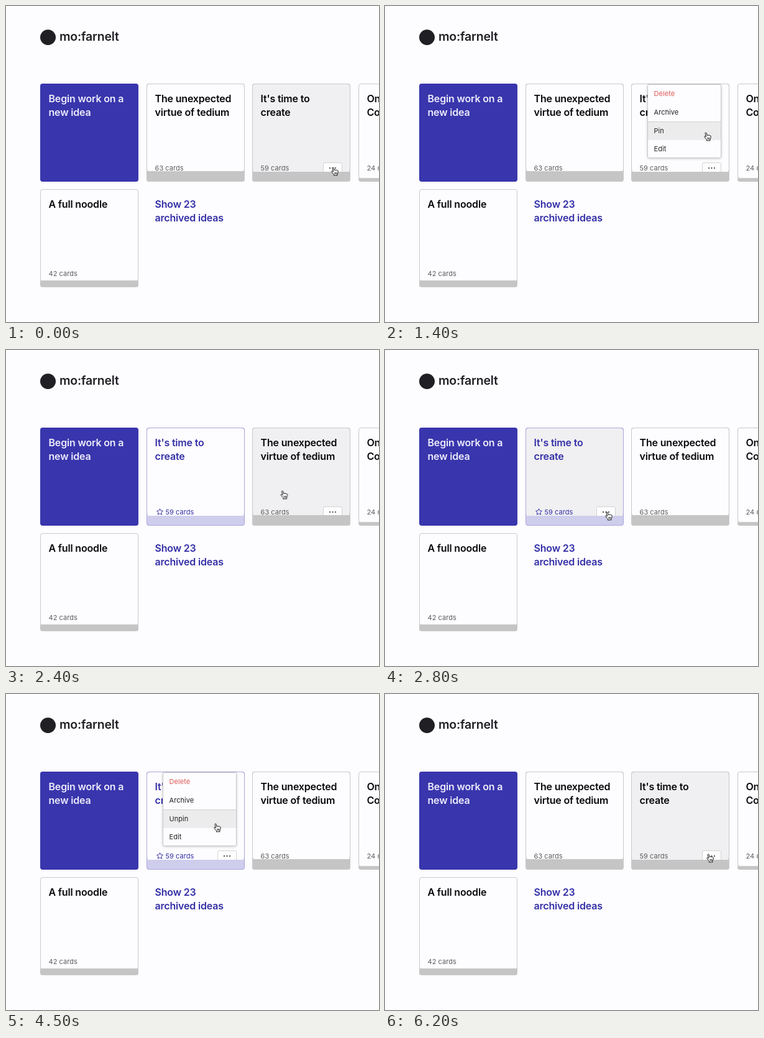
An HTML page for the animation above (6300 ms loop, 600 by 509 pixels).

```html
<!DOCTYPE html>
<html lang="en">
<head>
<meta charset="utf-8">
<title>Idea board</title>
<style>
html, body { margin: 0; width: 100%; height: 100%; overflow: hidden; background: #fdfcfe; }
body { position: relative; font: 11px/16px Inter, sans-serif; letter-spacing: .005em; color: #5c5c5f; }
div, svg, .brand { position: absolute; box-sizing: border-box; }

.mark { left: 55px; top: 37.5px; width: 25px; height: 25px; border-radius: 50%; background: #1f1f24; }
.brand { left: 86px; top: 36px; font: 600 19.5px/26px Inter, sans-serif; letter-spacing: -.011em; color: #1f1f24; }

.view { inset: 0; }
.card { left: var(--x); top: var(--y, 125px); width: 158px; height: 158px; border-radius: 4px; background: #c5c5c5; --line: #c9c9cb; }
.body { left: 0; top: 0; width: 158px; height: var(--h); overflow: hidden; border-radius: 4px; background: #fdfcfe; }
.edge { inset: 0; border: 1px solid var(--line); border-radius: 4px; }
.edge.low { bottom: auto; height: var(--h); border-color: var(--line) var(--line) transparent; }
.title { left: 13.5px; top: 13px; font: 600 16px/22px Inter, sans-serif; letter-spacing: -.011em; color: #08080a; white-space: nowrap; }
.count { left: 13.5px; top: 127.5px; white-space: nowrap; }
.new { background: #3936ad; }
.new .title { color: #edecfb; }
.pinned { background: #cfcdec; --line: #aaa8dc; }
.pinned .title, .pinned .count, .link .title { color: #332fa6; }
.pinned .count { left: 30.5px; }
.star { left: 16px; top: 130px; fill: none; stroke: #332fa6; stroke-linejoin: round; }
.glow { inset: 0; background: #f0eff1; }
.more { left: 114px; top: 127px; width: 31px; height: 17px; border: 1px solid #d2d1d4; border-radius: 3px; background: #fff; }
.more::after { content: ""; position: absolute; left: 9px; top: 7px; width: 2px; height: 2px; border-radius: 1px; background: #222; box-shadow: 4.5px 0 #222, 9px 0 #222; }

.menu { left: 26px; top: 1px; width: 119px; height: 119px; border: 1px solid #c8c7ca; border-radius: 3px; background: #fdfcfe; box-shadow: 0 1px 4px #0003; color: #222; overflow: hidden; }
.item { left: 0; width: 100%; height: 29.5px; padding-left: 9.5px; line-height: 29.5px; }
.item:nth-of-type(1) { top: 0; color: #dd5a54; }
.item:nth-of-type(2) { top: 29.5px; }
.item:nth-of-type(3) { top: 59px; border-top: 1px solid #d0cfd2; }
.item:nth-of-type(4) { top: 88.5px; }

.hand { left: -6px; top: -7.3px; overflow: visible; stroke: #111; stroke-linejoin: round; stroke-linecap: round; }

/* all states switch hard; one loop is 6.3 s */
.view, .glow, .more, .menu, .item { animation: 6.3s step-end infinite; }
.free { animation-name: free; }
.held { animation-name: held; }
.free .first .glow, .free .first .more { animation-name: before-leave; }
.free .second .glow { animation-name: idle; }
.free .second .more { animation-name: target; }
.free .menu { animation-name: open-free; }
.held .first .glow { animation-name: idle-held; }
.held .first .more { animation-name: target-held; }
.held .second .glow, .held .second .more { animation-name: leave-held; }
.held .menu { animation-name: open-held; }
.free .edit { animation-name: edit-free; }
.free .pin { animation-name: pin-free; }
.held .edit { animation-name: edit-held; }
.held .pin { animation-name: pin-held; }
.hand { animation: roam 6.3s step-end infinite; }

@keyframes free { 0%, 74.6%, 100% { opacity: 1 } 25.39% { opacity: 0 } }
@keyframes held { 0%, 74.6%, 100% { opacity: 0 } 25.39% { opacity: 1 } }
@keyframes before-leave { 0%, 93.65%, 100% { opacity: 0 } 50% { opacity: 1 } }
@keyframes idle { 0%, 93.65%, 100% { opacity: 1 } 6.34% { opacity: 0 } }
@keyframes target { 0%, 93.65%, 100% { opacity: 1 } 50% { opacity: 0 } }
@keyframes open-free { 0%, 25.39%, 100% { opacity: 0 } 6.34% { opacity: 1 } }
@keyframes idle-held { 0%, 50.79%, 100% { opacity: 0 } 39.68% { opacity: 1 } }
@keyframes target-held { 0%, 100% { opacity: 0 } 39.68% { opacity: 1 } }
@keyframes leave-held { 0% { opacity: 1 } 39.68%, 100% { opacity: 0 } }
@keyframes open-held { 0%, 100% { opacity: 0 } 50.79% { opacity: 1 } }
@keyframes edit-free { 0%, 15.87%, 100% { background: #fdfcfe } 12.69% { background: #ececed } }
@keyframes pin-free { 0%, 100% { background: #fdfcfe } 15.87% { background: #ececed } }
@keyframes edit-held { 0%, 65.07%, 100% { background: #fdfcfe } 61.9% { background: #ececed } }
@keyframes pin-held { 0%, 100% { background: #fdfcfe } 65.07% { background: #ececed } }

/* the pointer advances ten times a second */
@keyframes roam {
  0% { transform: translate(529px, 266px) }
  9.52% { transform: translate(529px, 266px); animation-timing-function: steps(3) }
  14.28% { transform: translate(524px, 217px); animation-timing-function: steps(2) }
  17.46% { transform: translate(519px, 210px) }
  33.33% { transform: translate(519px, 210px); animation-timing-function: steps(2) }
  36.5% { transform: translate(500px, 216px); animation-timing-function: steps(2) }
  39.68% { transform: translate(395px, 250px); animation-timing-function: steps(3) }
  44.44% { transform: translate(360px, 267px) }
  57.14% { transform: translate(360px, 267px); animation-timing-function: steps(3) }
  61.9% { transform: translate(348px, 235px); animation-timing-function: steps(3) }
  66.66% { transform: translate(340px, 215px) }
  85.71% { transform: translate(340px, 215px); animation-timing-function: steps(2) }
  88.88% { transform: translate(358px, 218px); animation-timing-function: steps(2) }
  92.06% { transform: translate(376px, 224px); animation-timing-function: steps(2) }
  95.23% { transform: translate(470px, 248px); animation-timing-function: steps(2) }
  98.41% { transform: translate(523px, 264px) }
  100% { transform: translate(529px, 266px) }
}
</style>
</head>
<body>
<div class="mark"></div>
<span class="brand">mo:farnelt</span>

<div class="card new" style="--x:55px"><div class="title">Begin work on a<br>new idea</div></div>
<div class="card" style="--x:567px;--h:153px">
  <div class="body"><div class="title">One thing<br>Connected</div><div class="count">24 cards</div><div class="edge"></div></div>
</div>
<div class="card" style="--x:55px;--y:295px;--h:148px">
  <div class="body"><div class="title">A full noodle</div><div class="count">42 cards</div><div class="edge"></div></div>
</div>
<div class="link" style="left:226px;top:295px"><div class="title">Show 23<br>archived ideas</div></div>

<div class="view free">
  <div class="card first" style="--x:226px;--h:140.5px">
    <div class="body"><div class="glow"></div><div class="title">The unexpected<br>virtue of tedium</div><div class="count">63 cards</div><div class="edge low"></div><div class="more"></div></div>
    <div class="edge"></div>
  </div>
  <div class="card second" style="--x:396px;--h:142px">
    <div class="body"><div class="glow"></div><div class="title">It's time to<br>create</div><div class="count">59 cards</div><div class="edge low"></div><div class="more"></div></div>
    <div class="edge"></div>
    <div class="menu"><div class="item">Delete</div><div class="item">Archive</div><div class="item pin">Pin</div><div class="item edit">Edit</div></div>
  </div>
</div>

<div class="view held">
  <div class="card pinned first" style="--x:226px;--h:142px">
    <div class="body"><div class="glow"></div><div class="title">It's time to<br>create</div>
      <svg class="star" width="11" height="11" viewBox="0 0 11 11"><path d="M5.5.7 7 3.8l3.4.5L8 6.7l.6 3.4-3.1-1.6-3.1 1.6L3 6.7.6 4.3 4 3.8Z"/></svg>
      <div class="count">59 cards</div><div class="edge low"></div><div class="more"></div></div>
    <div class="edge"></div>
    <div class="menu"><div class="item">Delete</div><div class="item">Archive</div><div class="item pin">Unpin</div><div class="item edit">Edit</div></div>
  </div>
  <div class="card second" style="--x:396px;--h:140.5px">
    <div class="body"><div class="glow"></div><div class="title">The unexpected<br>virtue of tedium</div><div class="count">63 cards</div><div class="edge low"></div><div class="more"></div></div>
    <div class="edge"></div>
  </div>
</div>

<svg class="hand" width="12" height="15" viewBox="0 0 12 15">
  <path fill="#fff" d="M3.4 11.2 1 8C.2 6.9 1.6 5.9 2.6 6.9L3.6 8 2.1 2.4C1.8.6 3.7.3 4.2 2l1 3.6C5.3 4.4 7.1 4.4 7.3 5.7 7.6 4.6 9.2 4.8 9.4 6 9.8 5.3 11 5.6 11.1 6.8 11.3 9 11 10.2 9.8 12v2H8.3L7.6 13l-.8 1H4.4V12.6Z"/>
  <path fill="none" stroke-width=".8" d="M5.8 9.2v2.6M7.4 9.2v2.6M9 9.2v2.5"/>
</svg>
</body>
</html>
```
